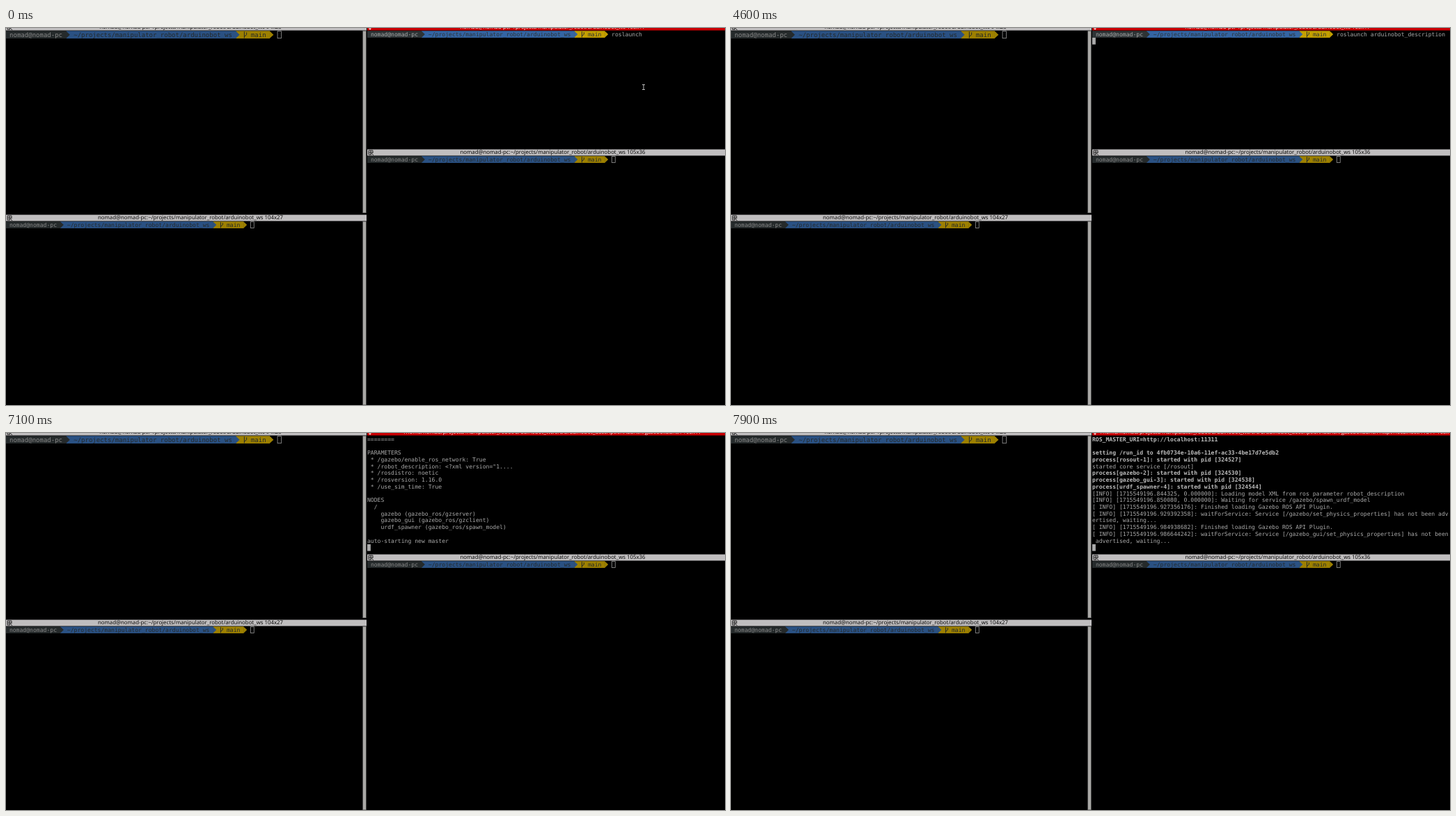
Write an HTML page with a canvas that moves like this. It is 1033 px wide and 542 px high and loops after 8000 ms.

```html
<!DOCTYPE html>
<html lang="en">
<head>
<meta charset="utf-8">
<title>Split terminal</title>
<style>
  html, body { margin: 0; width: 100%; height: 100%; overflow: hidden; background: #000; }
  canvas { display: block; }
</style>
</head>
<body>
<canvas id="stage" width="1033" height="542"></canvas>
<script>
const ctx = document.getElementById('stage').getContext('2d');
const LOOP = 8000, COLS = 105, ROWS = 17;
const SMALL = { size: 8.1, w: 4.876, h: 9.73 };
const LARGE = { size: 9, w: 5.418, h: 10.9 };
const BRIGHT = { dark: '#2e3436', blue: '#3465a4', yellow: '#c4a000', text: '#aaaaaa' };
const DIM = { dark: '#252a2b', blue: '#2a5183', yellow: '#9d8000', text: '#888888' };

const USER = 'nomad', HOST = USER + '-pc';
const WORKSPACE = 'projects/manipulator_robot/arduinobot_ws';
const SHELL_TITLE = `${USER}@${HOST}:~/${WORKSPACE}`;
const LAUNCH_TITLE = `/home/${USER}/${WORKSPACE}/src/arduinobot_description/launch/gazebo.launch`;
const COMMAND = 'roslaunch arduinobot_description gazebo.launch ';
const PROMPT_CELLS = 72;
const RUN_ID = '4fb0734e-10a6-11ef-ac33-4be17d7e5db2';

const LOG = `... logging to /home/${USER}/.ros/log/${RUN_ID}/roslaunch-${HOST}-324497.log
Checking log directory for disk usage. This may take a while.
Press Ctrl-C to interrupt
Done checking log file disk usage. Usage is <1GB.

started roslaunch server http://${HOST}:38211/

SUMMARY
========

PARAMETERS
 * /gazebo/enable_ros_network: True
 * /robot_description: <?xml version="1....
 * /rosdistro: noetic
 * /rosversion: 1.16.0
 * /use_sim_time: True

NODES
  /
    gazebo (gazebo_ros/gzserver)
    gazebo_gui (gazebo_ros/gzclient)
    urdf_spawner (gazebo_ros/spawn_model)

auto-starting new master
process[master]: started with pid [324517]
ROS_MASTER_URI=http://localhost:11311

setting /run_id to ${RUN_ID}
process[rosout-1]: started with pid [324527]
started core service [/rosout]
process[gazebo-2]: started with pid [324530]
process[gazebo_gui-3]: started with pid [324538]
process[urdf_spawner-4]: started with pid [324544]
[INFO] [1715549196.844325, 0.000000]: Loading model XML from ros parameter robot_description
[INFO] [1715549196.850080, 0.000000]: Waiting for service /gazebo/spawn_urdf_model
[ INFO] [1715549196.927356176]: Finished loading Gazebo ROS API Plugin.
[ INFO] [1715549196.929392358]: waitForService: Service [/gazebo/set_physics_properties] has not been adv
ertised, waiting...
[ INFO] [1715549196.984938682]: Finished loading Gazebo ROS API Plugin.
[ INFO] [1715549196.986644242]: waitForService: Service [/gazebo_gui/set_physics_properties] has not been
 advertised, waiting...`.split('\n');
const BOLD = /^(process|ROS_|setting|started roslaunch)/;

// [time, value] pairs; the last one reached holds
const TYPED = [[0, 9], [1500, 10], [2100, 11], [2200, 12], [2700, 13], [3000, 21], [4100, 22],
  [4200, 23], [4400, 24], [4600, 33], [5600, 34], [5700, 35], [6000, 36], [6200, 47]];
const LOGGED = [[0, 0], [6900, 5], [7100, 24], [7300, 30], [7400, 33], [7800, 35], [7900, 41]];
const CURSOR = [[0, 0], [500, 1], [800, 0], [1100, 1], [1700, 0], [2100, 1], [3500, 0],
  [4100, 1], [5100, 0], [5600, 1], [7400, 0], [7800, 1]];
const TITLES = [[0, SHELL_TITLE], [6700, COMMAND.trim()], [6900, LAUNCH_TITLE],
  [7300, LAUNCH_TITLE + ' http://localhost:11311']];
const at = (steps, t) => steps.findLast(step => step[0] <= t)[1];

function rect(x, y, w, h, color) {
  ctx.fillStyle = color;
  ctx.fillRect(x, y, w, h);
}

function lines(color, width, ...paths) {
  ctx.strokeStyle = color;
  ctx.lineWidth = width;
  ctx.beginPath();
  for (const path of paths) path.forEach(([x, y], i) => i ? ctx.lineTo(x, y) : ctx.moveTo(x, y));
  ctx.stroke();
}

function write(text, x, top, font, color, bold = false) {
  ctx.font = `${bold ? 'bold ' : ''}${font.size}px "DejaVu Sans Mono", monospace`;
  ctx.fillStyle = color;
  ctx.fillText(text, x, top + font.size * 0.93);
}

function titleBar(x, y, width, center, text, active) {
  const ink = active ? '#ffffff' : '#000000';
  rect(x, y, width, 9, active ? '#c80003' : '#c0bebf');
  ctx.font = '7.85px "Open Sans", sans-serif';
  ctx.fillStyle = ink;
  ctx.fillText(text, Math.max(x + 12, center - ctx.measureText(text).width / 2), y + 6.9);
  if (active) {
    ctx.beginPath();
    ctx.moveTo(x + 2, y + 6);
    ctx.lineTo(x + 6, y + 6);
    ctx.lineTo(x + 4, y + 8.3);
    ctx.fill();
  } else {
    const l = x + 2, t = y + 1.5;
    lines(ink, 0.8, [[l, t], [l + 6, t], [l + 6, t + 4]], [[l, t], [l, t + 6], [l + 4, t + 6]],
      [[l, t + 3], [l + 6, t + 3]], [[l + 3, t], [l + 3, t + 6]], [[l + 4, t + 4], [l + 7, t + 7]]);
  }
}

function prompt(x, top, font, colors) {
  const { w, h } = font;
  const cell = n => x + n * w;
  // Right to left, so each pointed end covers the segment after it
  for (const [from, to, color] of [[61, 70, 'yellow'], [16, 61, 'blue'], [0, 16, 'dark']]) {
    rect(cell(from), top, (to - from) * w, h, colors[color]);
    ctx.beginPath();
    ctx.moveTo(cell(to) - 0.2, top);
    ctx.lineTo(cell(to + 1), top + h / 2);
    ctx.lineTo(cell(to) - 0.2, top + h);
    ctx.fill();
  }
  write(`${USER}@${HOST}`, cell(1), top, font, colors.text);
  write('~/' + WORKSPACE, cell(18), top, font, colors.dark);
  write('main', cell(65), top, font, colors.dark);
  const b = cell(63) + w * 0.25, r = b + w * 0.6;
  lines(colors.dark, 1, [[b, top + h * 0.1], [b, top + h * 0.95]],
    [[b, top + h * 0.75], [r, top + h * 0.5], [r, top + h * 0.2]]);
}

function idlePane(x, top, font) {
  prompt(x, top, font, DIM);
  ctx.strokeStyle = '#999';
  ctx.lineWidth = 0.8;
  ctx.strokeRect(x + PROMPT_CELLS * font.w + 0.3, top + 0.4, font.w, font.h - 0.8);
}

function scrollbar(y, height) {
  rect(512, y, 6, height, '#454545');
  rect(513, y + 0.5, 4, height - 1, '#aaa9a6');
}

function activePane(t) {
  const x = 519, top = 4.2, { w, h } = SMALL;
  const typed = COMMAND.slice(0, at(TYPED, t));
  const logged = at(LOGGED, t);
  const room = COLS - PROMPT_CELLS;
  const rows = [typed.slice(0, room)];
  if (typed.length >= room) rows.push(typed.slice(room));
  rows.push(...LOG.slice(0, logged));

  const first = Math.max(0, rows.length - ROWS + 1);
  if (!first) prompt(x, top, SMALL, BRIGHT);
  rows.slice(first).forEach((text, i) => {
    const left = first + i ? x : x + PROMPT_CELLS * w;
    const bold = BOLD.test(text);
    write(text, left, top + i * h, SMALL, bold ? '#bcbcbc' : BRIGHT.text, bold);
  });

  if (at(CURSOR, t)) {
    const end = PROMPT_CELLS + typed.length;
    const col = logged ? 0 : end % COLS;
    const row = logged ? rows.length - first : Math.floor(end / COLS);
    rect(x + col * w, top + row * h, w, h, BRIGHT.text);
  }
}

function pointer(x, y) {
  lines('#bbb', 1, [[x, y - 3.5], [x, y + 3.5]],
    [[x - 2, y - 3.5], [x + 2, y - 3.5]], [[x - 2, y + 3.5], [x + 2, y + 3.5]]);
}

function draw(t) {
  ctx.textRendering = 'geometricPrecision';
  rect(0, 0, 1033, 542, '#000');

  titleBar(0, -5.5, 518, 265, SHELL_TITLE + ' 94x25', false);
  idlePane(-0.3, 4.2, LARGE);
  scrollbar(4, 262);

  titleBar(0, 268.5, 518, 265, SHELL_TITLE + ' 104x27', false);
  idlePane(0, 278.2, SMALL);
  scrollbar(278, 264);

  titleBar(519, 174.5, 514, 785.5, SHELL_TITLE + ' 105x36', false);
  idlePane(519, 184.2, SMALL);

  titleBar(519, -5.5, 514, 785.5, at(TITLES, t) + ' 105x17', true);
  activePane(t);
  if (t < 1100) pointer(916, 85);
}

function tick() {
  draw(performance.now() % LOOP);
  requestAnimationFrame(tick);
}
tick();
</script>
</body>
</html>
```
